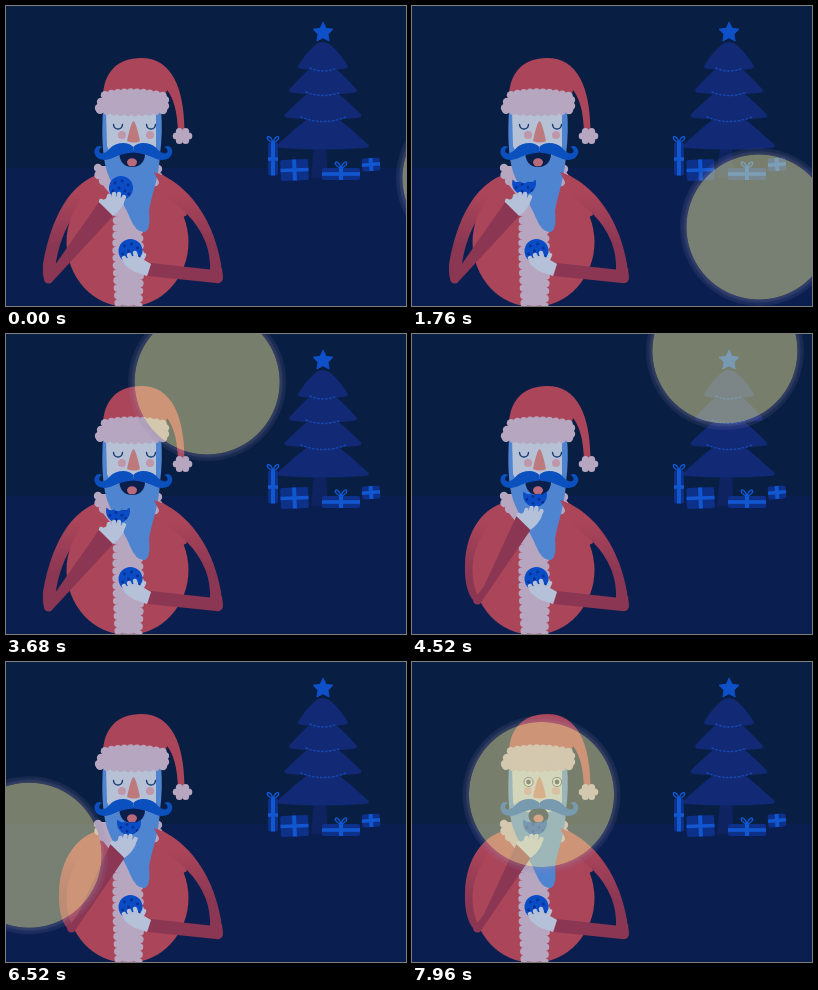
These frames come from a looping animation (400 by 300 pixels, 8 s). An HTML page with a canvas:

```html
<!DOCTYPE html>
<html lang="en">
<head>
<meta charset="utf-8">
<title>Midnight snack</title>
<style>
html, body { margin: 0; width: 100%; height: 100%; overflow: hidden; background: #091e43; }
canvas { display: block; width: 400px; height: 300px; }
</style>
</head>
<body>
<canvas id="stage" width="400" height="300"></canvas>
<script>
const ctx = document.getElementById('stage').getContext('2d');
const LOOP = 8000, CAUGHT = 7400, FIRST_BITE = 600;
const RED = '#ab4559', DARK_RED = '#8b3754', FUR = '#b6a6c0', SKIN = '#b7c1d6',
  BEARD = '#4f84d0', BLUE = '#0b50bf', GLOVE = '#b5c1d9', NAVY = '#0a1f4c',
  TREE = '#122a75', TRUNK = '#0e2360', GIFT = '#0d3088', RIBBON = '#1157cf';

const clamp = x => Math.max(0, Math.min(1, x));
const ease = x => (1 - Math.cos(Math.PI * clamp(x))) / 2;
const mix = (a, b, u) => a + (b - a) * u;

function fill(path, color) {
  ctx.fillStyle = color;
  ctx.fill(new Path2D(path));
}
function line(path, color, width) {
  ctx.strokeStyle = color;
  ctx.lineWidth = width;
  ctx.stroke(new Path2D(path));
}
function oval(x, y, rx, ry, color) {
  ctx.fillStyle = color;
  ctx.beginPath();
  ctx.ellipse(x, y, rx, ry, 0, 0, 2 * Math.PI);
  ctx.fill();
}
const dot = (x, y, r, color) => oval(x, y, r, r, color);

// Spotlight keys: time, x, y
const route = [
  [0, 469, 172], [840, 398, 213], [1760, 347, 221], [2560, 322, 222],
  [3000, 240, 160], [3360, 197, 88], [3680, 201, 48], [4200, 304, 20],
  [4360, 320, 17], [4520, 313, 17], [5080, 248, -12], [5760, 75, -20],
  [6100, 30, 60], [6520, 23, 193], [6900, 75, 226], [7250, 145, 180],
  [7600, 129.5, 132.5], [8000, 129.5, 132.5]
];

function along(t) {
  let i = 0;
  while (i < route.length - 2 && t >= route[i + 1][0]) i++;
  const a = route[i], b = route[i + 1], span = b[0] - a[0], u = clamp((t - a[0]) / span);
  if (i === route.length - 2) return [b[1], b[2]];
  const slope = (k, n) => {
    const p = route[Math.max(0, k - 1)], q = route[Math.min(route.length - 1, k + 1)];
    return k === route.length - 2 ? 0 : (q[n] - p[n]) / (q[0] - p[0]) * span;
  };
  return [1, 2].map(n => {
    const u2 = u * u, u3 = u2 * u;
    return (2 * u3 - 3 * u2 + 1) * a[n] + (u3 - 2 * u2 + u) * slope(i, n)
      + (3 * u2 - 2 * u3) * b[n] + (u3 - u2) * slope(i + 1, n);
  });
}

// 0 = hand at the chest, 1 = hand at the mouth
function lift(t) {
  const start = Math.floor((t + 280) / 2000) * 2000 - 280;
  const from = Math.max(0, start);
  const rise = ease((t - from) / (start + 760 - from));
  if (start > 5720) return 1;
  return start === 5720 ? rise : rise - ease((t - start - 980) / 1000);
}

function room() {
  ctx.fillStyle = '#091e43';
  ctx.fillRect(0, 0, 400, 162);
  ctx.fillStyle = '#0a1f50';
  ctx.fillRect(0, 162, 400, 138);
}

function tree() {
  fill('M308 140H320L322 172H305Z', TRUNK);
  const tiers = [[36, 63, 25], [56, 87, 34], [79, 112, 38.5], [104, 142, 46]];
  for (const [top, low, w] of tiers) {
    const x = 317;
    fill(`M${x} ${top}C${x + 8} ${top} ${x + w * .72} ${low - 14} ${x + w} ${low - 3}
      Q${x + w} ${low} ${x + w - 5} ${low}Q${x} ${low + 3} ${x - w + 5} ${low}
      Q${x - w} ${low} ${x - w} ${low - 3}C${x - w * .72} ${low - 14} ${x - 8} ${top} ${x} ${top}Z`, TREE);
  }
  ctx.setLineDash([1.5, 2.5]);
  line('M304 62Q317 68 331 62M300 86Q317 93 335 86M295 111Q317 120 340 111', '#1448b4', 1.4);
  ctx.setLineDash([]);
  ctx.beginPath();
  for (let i = 0; i < 10; i++) {
    const a = i * Math.PI / 5 - Math.PI / 2, r = i % 2 ? 5.2 : 10.5;
    ctx.lineTo(317 + r * Math.cos(a), 26.5 + r * Math.sin(a));
  }
  ctx.closePath();
  ctx.fillStyle = ctx.strokeStyle = '#0d50c8';
  ctx.lineWidth = 1;
  ctx.fill();
  ctx.stroke();
}

function gift(x, y, w, h, bow, turn = 0) {
  ctx.save();
  ctx.translate(x, y);
  ctx.rotate(turn);
  ctx.fillStyle = GIFT;
  ctx.beginPath();
  ctx.roundRect(-w / 2, -h / 2, w, h, 2);
  ctx.fill();
  ctx.fillStyle = RIBBON;
  ctx.fillRect(-2, -h / 2, 4, h);
  ctx.fillRect(-w / 2, -1.8, w, 3.6);
  if (bow) {
    ctx.translate(0, -h / 2);
    line('M0 0C-4 -1 -7 -4 -5 -6Q-2 -6 0 0C4 -1 7 -4 5 -6Q2 -6 0 0', RIBBON, 1.4);
  }
  ctx.restore();
}

function gifts() {
  gift(267, 153, 10, 33, true);
  gift(288.5, 164, 28, 21, false, -.04);
  gift(335, 168, 38, 12, true);
  gift(365, 158.5, 18, 13, false, -.08);
}

function cookie(x, y, bitten) {
  ctx.save();
  ctx.translate(x, y);
  const shape = new Path2D(bitten
    ? 'M-11.5 -5A12 12 0 1 0 11.5 -5Q8 -1 4 -3Q0 0 -4 -3Q-8 -1 -11.5 -5Z'
    : 'M-12 0A12 12 0 1 0 12 0A12 12 0 1 0 -12 0Z');
  ctx.fillStyle = '#0a4cc6';
  ctx.fill(shape);
  ctx.clip(shape);
  for (const [cx, cy] of [[-6, -5], [1, -7], [7, -3], [-2, 0], [-8, 3], [4, 3], [-2, 7], [8, 6]])
    dot(cx, cy, 1.4, '#0a2f8c');
  ctx.restore();
}

function body() {
  oval(121.5, 236, 61, 65, RED);
  fill('M94 167Q122 158 152 166Q172 176 181 209L122 240L68 209Q78 176 94 167Z', RED);
  fill('M91 160H153L150 178L136 198L135 230L134 298Q122 302 111 298L110 240L112 198L96 178Z', FUR);
  for (let y = 192; y < 298; y += 7.5) {
    dot(111.5 - 1.5 * Math.sin((y - 190) / 30), y, 3.7, FUR);
    dot(133.5 + Math.sin(y / 18), y + 3, 3.7, FUR);
  }
  for (const [x, y] of [[92, 162], [92.5, 169], [97, 175], [152, 163], [152, 170], [149, 176]])
    dot(x, y, 4.2, FUR);
}

function sleeve(path) {
  const tone = ctx.createLinearGradient(0, 188, 0, 238);
  tone.addColorStop(0, RED);
  tone.addColorStop(1, DARK_RED);
  fill(path, tone);
}

function restingArm() {
  sleeve('M148 166C175 174 206 205 215 258L216 271L204 266Q206 234 181 208L160 190Z');
  fill('M216 262L217 271Q217 278 210 277L142 270L145 257L204 263.5Z', DARK_RED);
  cookie(124.5, 245, false);
  fill('M145 258L141 270L129 266Q119 261 118 255Q124 248 133 251Z', GLOVE);
  line('M121 258L118 252M126 256L123 249M131 254L129 247M136 253L138 249', GLOVE, 4.5);
}

// Elbow, outer edge and hand of the eating arm
const pose = u => ({
  ex: mix(41, 64, u), ey: mix(277, 270, u), out: mix(37, 53, u), bulge: mix(258, 231, u),
  hx: mix(105, 116.5, u), hy: mix(197, 183, u)
});

function upperArm(u) {
  const { ex, ey, out, bulge } = pose(u);
  sleeve(`M98 167C72 172 ${mix(47, 54, u)} ${mix(200, 195, u)} ${out} ${bulge}
    Q${out - 1} ${ey - mix(0, 10, u)} ${ex + 1} ${ey}L${ex + 8} ${ey - 14}
    Q${mix(53, 60, u)} ${mix(230, 226, u)} 70 206L92 192Z`);
}

function foreArm(u, bitten) {
  const { ex, ey, hx, hy } = pose(u);
  fill(`M${ex - 3} ${ey - 3}Q${ex - 1} ${ey + 2} ${ex + 4} ${ey}L${hx + 2} ${hy + 13}
    L${hx - 12} ${hy - 1}L${ex + 8} ${ey - 18}Z`, DARK_RED);
  cookie(mix(bitten ? 112 : 115, 123, u), mix(bitten ? 178.5 : 182, 162.5, u), bitten);
  ctx.save();
  ctx.translate(hx, hy);
  fill('M-12 -1L2 13Q10 7 13 0Q14 -6 7 -6Q1 -8 -4 -5Z', GLOVE);
  line('M-3 -2L-2 -7M2 -3L3 -9M7 -3L8 -9M11 -2L13 -6M-5 1L-10 -2', GLOVE, 4.4);
  ctx.restore();
}

function face(open) {
  fill('M97 104Q95 138 99 158C103 178 116 192 124 212Q130 227 139 226Q145 223 143 205C146 187 153 172 154 148Q157 126 155 104Z', BEARD);
  fill('M100 104H150V140Q147 151 127 151Q104 151 101 140Z', SKIN);
  dot(116, 129, 4, '#c097aa');
  dot(144, 129, 4, '#c097aa');
  fill('M127.5 115Q130 116 134 135Q128 138 121 135Q125 116 127.5 115Z', '#bd7a7d');
  if (open) {
    for (const x of [116.5, 145]) {
      dot(x, 120, 5, '#40506f');
      dot(x, 120, 4, '#d2d8e6');
      dot(x, 120, 2.4, '#30405f');
    }
    oval(126.5, 154, 10, 9, NAVY);
    oval(126.5, 156.5, 5, 4, '#b8697a');
  } else {
    line('M107.5 118.5Q108 123 112 123Q116 123 116.5 118.5M140.5 118.5Q141 123 145 123Q149 123 149.5 118.5', '#173a73', 1.4);
    fill('M113 145H139.5Q139 161 126 161Q113.5 161 113 145Z', NAVY);
    oval(126, 156.3, 5, 4, '#b8697a');
  }
  const half = 'M0 141C-5 135 -17 136 -23 142C-27 147 -32 149 -34 146Q-35 143 -31 141Q-37 138 -39 145C-39 153 -30 156 -22 152.5C-15 149 -8 147 0 146.5Z';
  for (const side of [1, -1]) {
    ctx.save();
    ctx.translate(127.3, 0);
    ctx.scale(side, 1);
    fill(half, BLUE);
    ctx.restore();
  }
}

function hat() {
  fill('M97 92C97 66 112 52 135 52C166 52 178 82 178.5 124L172 125C171 105 168 93 161 84L158 95Z', RED);
  fill('M98 90Q126 80 158 90L158 101Q126 112 93 104Z', FUR);
  for (let i = 0; i < 10; i++) {
    const top = 99 + i * 6.4, low = 94 + i * 7;
    dot(top, 86.5 + 3.5 * ((top - 126) / 31) ** 2, 4.2, FUR);
    dot(low, 106 - 2 * ((low - 126) / 31) ** 2, 4.2, FUR);
  }
  for (const [x, y] of [[93, 102], [95, 96], [159, 94], [159, 100]]) dot(x, y, 4.2, FUR);
  for (let i = 0; i < 6; i++) {
    const a = i * Math.PI / 3;
    dot(176.5 + 6.3 * Math.cos(a), 130 + 5.2 * Math.sin(a), 3.5, FUR);
  }
  dot(176.5, 130, 5, FUR);
}

function spotlight(x, y) {
  const r = 79, glow = ctx.createRadialGradient(x, y, 0, x, y, r);
  const stops = [[0, 'rgba(245,238,155,.465)'], [72, 'rgba(245,238,155,.465)'],
    [72.8, 'rgba(165,150,165,.28)'], [75, 'rgba(150,140,175,.24)'],
    [76, 'rgba(140,130,180,.15)'], [79, 'rgba(140,130,180,.1)']];
  for (const [d, color] of stops) glow.addColorStop(d / r, color);
  dot(x, y, r, glow);
}

function draw(t) {
  const u = lift(t);
  ctx.lineCap = ctx.lineJoin = 'round';
  room();
  tree();
  gifts();
  upperArm(u);
  body();
  face(t >= CAUGHT);
  restingArm();
  foreArm(u, t >= FIRST_BITE);
  hat();
  spotlight(...along(t));
}

const begin = performance.now();
function tick() {
  draw((performance.now() - begin) % LOOP);
  requestAnimationFrame(tick);
}
tick();
</script>
</body>
</html>
```
